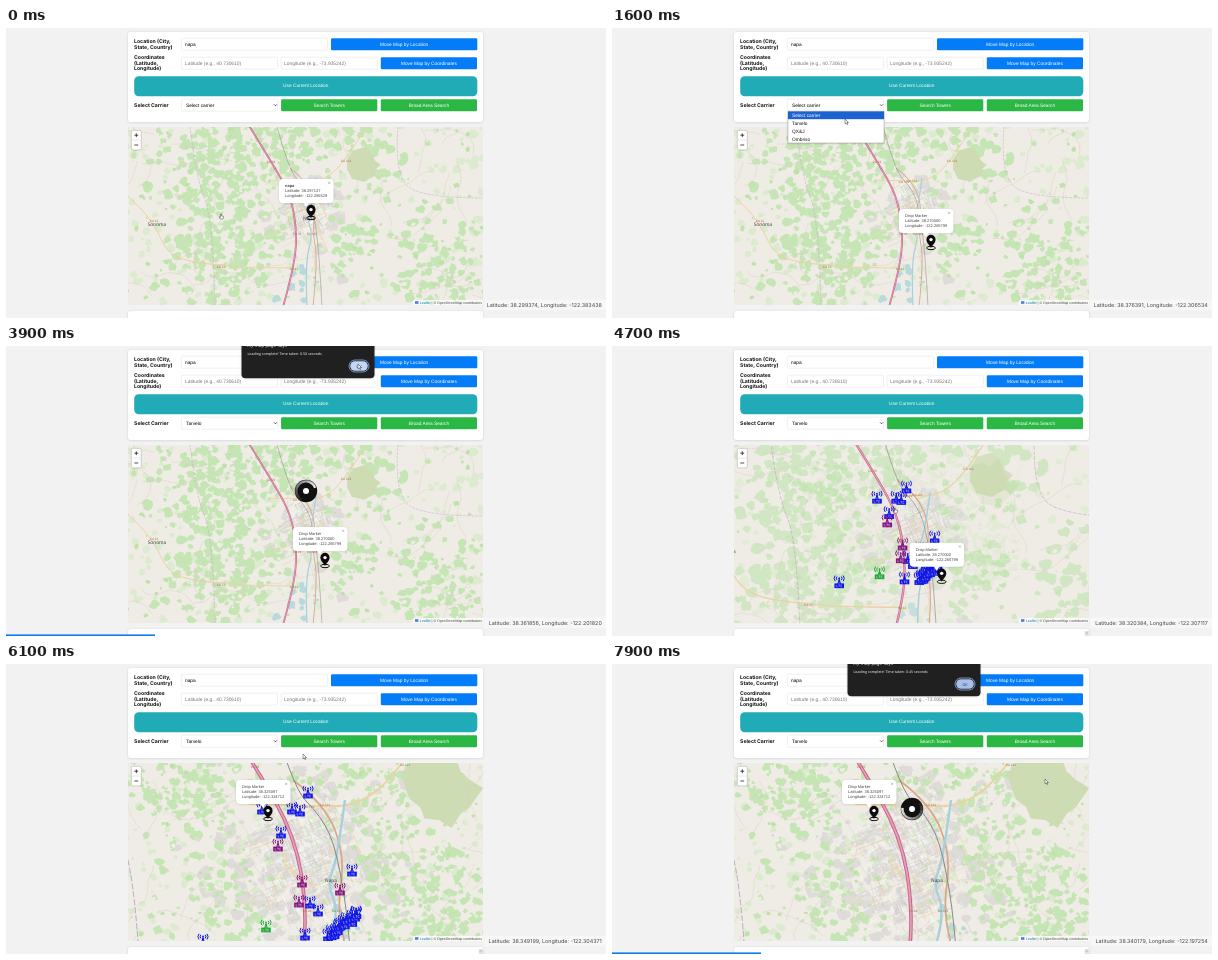
These frames come from a looping animation (600 px wide and 290 px high, 8 s). An HTML page:

```html
<!DOCTYPE html>
<html lang="en">
<head>
<meta charset="utf-8">
<title>Tower search map</title>
<style>
  html, body { margin: 0; width: 100%; height: 100%; overflow: hidden; background: #f2f2f2; }
  svg { display: block; width: 600px; height: 290px; }
  text { font-family: "Liberation Sans", Arial, sans-serif; font-size: 4.8px; text-rendering: geometricPrecision; white-space: pre; }
  .label { font: 700 5.16px Inter, sans-serif; fill: #111; }
  .status { font: 400 5.38px Inter, sans-serif; fill: #444; text-anchor: end; }
  .btn { fill: #fff; text-anchor: middle; }
  .hint { font-size: 4.92px; fill: #777; }
  .small { font-size: 4px; fill: #444; }
  .credit { font-size: 3.58px; fill: #444; }
  .shield { font-size: 3.2px; fill: #a5713f; text-anchor: middle; }
  .place { font: 4.8px "Noto Sans", sans-serif; fill: #444; text-anchor: middle; }
  .dialog { font: 3.62px "Open Sans", sans-serif; fill: #fff; }
  .land path { stroke-linejoin: round; }
</style>
</head>
<body>
<svg id="stage" viewBox="0 0 600 290"></svg>
<script>
const LOOP = 8000;
const FOCUS = [281, 164]; // the point the map zooms around
const $ = id => document.getElementById(id);
const clamp = v => Math.max(0, Math.min(1, v));
const ease = v => { v = clamp(v); return v * v * (3 - 2 * v); };
const mix = (a, b, u) => a.map((v, i) => v + (b[i] - v) * u);
const within = (t, a, b) => t >= a && t < b;

let seed = 29;
const rnd = () => (seed = (seed * 16807) % 2147483647) / 2147483647;
const spread = () => rnd() + rnd() - 1;
const fix = p => p.map(v => v.toFixed(1)).join(' ');
const line = pts => 'M' + pts.map(fix).join('L');

const rect = (x, y, w, h, fill, more = '') =>
  `<rect x="${x}" y="${y}" width="${w}" height="${h}" fill="${fill}" ${more}/>`;
const text = (x, y, str, cls = '', more = '') =>
  `<text x="${x}" y="${y}" class="${cls}" ${more}>${str}</text>`;
const stroke = (d, color, w, more = '') =>
  `<path d="${d}" fill="none" stroke="${color}" stroke-width="${w}" ${more}/>`;
const fill = (d, color) => `<path d="${d}" fill="${color}"/>`;

/* ---------- map ---------- */
function curve(pts) {
  const mid = (a, b) => mix(a, b, 0.5);
  let d = 'M' + fix(pts[0]);
  for (let i = 1; i < pts.length - 1; i++) {
    const end = i < pts.length - 2 ? mid(pts[i], pts[i + 1]) : pts[i + 1];
    d += `Q${fix(pts[i])} ${fix(end)}`;
  }
  return d;
}
function blob(x, y, r) {
  const pts = [];
  for (let a = 0; a < 6.2; a += 0.7) {
    const q = r * (0.6 + 0.7 * rnd());
    pts.push([x + q * 1.1 * Math.cos(a), y + q * Math.sin(a)]);
  }
  return line(pts) + 'Z';
}
// Density field made of soft round spots [x, y, radius].
const field = spots => (x, y) => spots.reduce(
  (sum, [cx, cy, r]) => sum + Math.exp(-((x - cx) ** 2 + (y - cy) ** 2) / (r * r)), 0);
function scatter(density, step, size) {
  let d = '';
  for (let x = 119; x < 482; x += step)
    for (let y = 96; y < 282; y += step) {
      const patchy = 0.45 + 0.4 * Math.sin(x * 0.23 + y * 0.09) * Math.sin(y * 0.21 - x * 0.05);
      if (rnd() < density(x, y) * patchy)
        d += blob(x + step * spread(), y + step * spread(), size * (0.4 + 0.9 * rnd()));
    }
  return d;
}
function streets([cx, cy, r], count, len, tilt) {
  let d = '';
  for (let i = 0; i < count; i++) {
    const x = cx + r * 0.9 * spread(), y = cy + r * 1.2 * spread();
    const a = tilt + (i % 2) * Math.PI / 2, l = len * (0.4 + rnd());
    d += line([[x, y], [x + l * Math.cos(a), y + l * Math.sin(a)]]);
  }
  return d;
}
function trails(count) {
  let d = '';
  for (let i = 0; i < count; i++) {
    let x = 122 + 355 * rnd(), y = 99 + 178 * rnd(), a = 6.3 * rnd();
    const pts = [];
    for (let k = 0; k < 12; k++) {
      a += spread() * 0.8;
      pts.push([x += 6 * Math.cos(a), y += 6 * Math.sin(a)]);
    }
    d += curve(pts);
  }
  return d;
}
function scene({ woods, town, hill, water, size }) {
  const forest = field(woods), built = field([town]), wet = field([water]);
  const open = (x, y) => 1 - clamp(built(x, y) * 1.1);
  return rect(0, 0, 600, 400, '#efece5')
    + fill(scatter(built, 5, 6), '#dedbd9')
    + fill(scatter((x, y) => 0.22, 6, 3.6), '#dcebcf')
    + fill(scatter((x, y) => 1.15 * forest(x, y) * open(x, y), 4.6, size), '#c6e5b5')
    + fill(scatter((x, y) => 0.35 * forest(x, y), 6, 2.2), '#efece5')
    + fill(scatter((x, y) => 0.12, 6, 2.2), '#bfe2ab')
    + fill(blob(...hill) + blob(...hill), '#cddcb3')
    + fill(scatter(wet, 5, 3), '#b8d9de')
    + stroke(trails(44), '#d8cdc2', 0.45)
    + stroke(streets(town, 8 * town[2], 7, 1.15), '#f9f8f6', 0.6)
    + stroke(streets(town, 3 * town[2], 10, 1.15), '#c4bfbc', 0.4)
    + stroke(streets(town, 0.6 * town[2], 22, 1.2), '#ecd9ad', 0.8);
}
const far = {
  woods: [[222, 125, 52], [225, 225, 50], [355, 130, 30], [346, 214, 20], [432, 245, 42], [290, 112, 25]],
  town: [303, 180, 26], hill: [355, 137, 14], water: [296, 256, 15], size: 4
};
const near = {
  woods: [[180, 125, 48], [222, 245, 45], [365, 120, 38], [425, 240, 52], [365, 200, 26]],
  town: [297, 195, 66], hill: [438, 124, 34], water: [338, 262, 9], size: 3.6
};
// Roads carry their shield at every second bend.
const roads = [
  { pts: [[122, 168], [148, 192], [162, 230], [215, 238], [262, 240], [288, 240]], color: '#ecd2a4', w: 1 },
  { pts: [[262, 152], [292, 153], [318, 153], [340, 132], [361, 98]], color: '#ead3a0', w: 0.9, name: 'CA 121' },
  { pts: [[284, 140], [300, 152], [310, 178], [306, 205], [312, 230], [307, 279]], color: '#d9a888', w: 0.9, name: 'CA 121' },
  { pts: [[310, 150], [306, 180], [301, 192], [307, 206], [299, 235], [301, 279]], color: '#a6d1dc', w: 1.2 },
  { pts: [[271, 98], [283, 143], [298, 158], [306, 175], [313, 220], [316, 279]], color: '#8c8784', w: 0.5 },
  { pts: [[242, 96], [265, 133], [285, 168], [291, 205], [288, 240], [277, 279]], color: '#c9648d', w: 1.8, name: 'CA 29' }
];
roads[0].name = 'CA 12';
const borders = [[[184, 98], [190, 150], [207, 190], [209, 279]], [[392, 98], [388, 150], [420, 170], [478, 170]]];
const places = [[303, 190, 'Napa', 'place'], [151, 196, 'Sonoma', 'place']];
for (const { pts, name } of roads)
  if (name) pts.filter((_, i) => i % 2 === 1).forEach(([x, y]) => places.push([x, y, name, 'shield']));

const network = () => borders.map(b => stroke(curve(b), '#bfa9c0', 0.5, 'stroke-dasharray="3 1"')).join('')
  + roads.map(r => stroke(curve(r.pts), r.color, r.w)).join('')
  + stroke(curve(roads[5].pts), '#e6a2b9', 0.8);

/* ---------- towers, placed in zoomed-in coordinates ---------- */
const BLUE = '#1016e6', PURPLE = '#86147f', GREEN = '#22a63c';
const row = (x, y, dx, dy, n, color = BLUE, jitter = 0) =>
  Array.from({ length: n }, (_, i) =>
    [x + i * dx + jitter * spread(), y + i * dy + jitter * spread(), color]);
const towers = [
  row(302, 128, -46, 16, 2), row(286, 144, 8, 2, 2), row(275, 168, 29, 70, 2),
  row(312, 246, -13, 24, 2), row(346, 206, 4, 42, 2), row(197, 276, 0, 0, 1),
  row(322, 271, 2, -1.5, 15, BLUE, 3), row(272, 181, 24, 36, 2, PURPLE),
  row(293, 237, 41, -12, 2, PURPLE), row(260, 262, 0, 0, 1, GREEN)
].flat();

const towerIcon = color => `<g fill="none" stroke="${color}" stroke-width="1">
  <path d="M-2.2-5.2Q-3.6-3.5-2.2-1.6M2.2-5.2Q3.6-3.5 2.2-1.6M-4-6.2Q-6.2-3.5-4-.6M4-6.2Q6.2-3.5 4-.6M0-3.5V2M-1.4 2L0-2L1.4 2"/>
  <circle cy="-3.6" r=".9" fill="${color}" stroke="none"/></g>
  ${rect(-4.8, 1.6, 9.6, 4.8, color)}
  <path d="M-2.9 3v2.2h1.3M-.8 3.1h1.6M0 3v2.2M3 3.1h-1.4v2h1.4" fill="none" stroke="#fff" stroke-width=".45" opacity=".8"/>`;

/* ---------- page ---------- */
const col = i => 175.4 + 99.7 * i; // three equal columns
const W = 96.2, H = 12, ROWS = [10.2, 29.2, 71.2];
const blue = ['#047cf8', '#0560c4'], teal = ['#21abb6', '#1c98a2'], green = ['#2bb744', '#259537'];
const buttons = [
  [325, ROWS[0], 146.3, H, blue, 'Move Map by Location'],
  [col(2), ROWS[1], W, H, blue, 'Move Map by Coordinates'],
  [128.2, 48.2, 343.1, 20, teal, 'Use Current Location'],
  [col(1), ROWS[2], W, H, green, 'Search Towers'],
  [col(2), ROWS[2], W, H, green, 'Broad Area Search']
];
const carriers = ['Select carrier', 'Tarvelo', 'QX&amp;J', 'Ombriso'];
const field2 = (x, y, w) => rect(x, y, w, H, '#fff', 'rx="1.3" stroke="#dadada" stroke-width=".4"');
const labels = (y, step, ...rows) => rows.map((s, i) => text(128, y + i * step, s, 'label')).join('');

function button([x, y, w, h, [base], str], i) {
  const tall = h > H;
  return rect(x, y, w, h, base, `id="btn${i}" rx="${tall ? 4.5 : 1.3}"`)
    + text(x + w / 2, y + h / 2 + (tall ? 0.5 : 1.6), str, 'btn');
}
function ring() {
  let s = '';
  for (let i = 0; i < 16; i++)
    s += `<path d="M0-9.6A9.6 9.6 0 0 1 3.75-8.84" fill="none" stroke="#fff" stroke-width="2.4"
      opacity="${clamp((i - 5) / 11).toFixed(2)}" transform="rotate(${i * 22.5})"/>`;
  return s;
}

$('stage').innerHTML = `
<defs>
  <clipPath id="frame"><rect x="122" y="99" width="355" height="178"/></clipPath>
  <filter id="shade" x="-10%" y="-10%" width="120%" height="130%" color-interpolation-filters="sRGB">
    <feDropShadow dx="0" dy=".4" stdDeviation="1.3" flood-opacity=".14"/></filter>
</defs>
${rect(0, 0, 600, 290, '#f2f2f2')}
${rect(122, 4, 355, 90, '#fff', 'rx="2.4" filter="url(#shade)"')}
${rect(122, 283, 355, 20, '#fff', 'rx="2.4" filter="url(#shade)"')}
${labels(15, 6, 'Location (City,', 'State, Country)')}
${labels(31, 5.6, 'Coordinates', '(Latitude,', 'Longitude)')}
${labels(79, 0, 'Select Carrier')}
${field2(col(0), ROWS[0], 146.3)}${text(179, 17.8, 'napa')}
${field2(col(0), ROWS[1], W)}${text(179, 36.8, 'Latitude (e.g., 40.730610)', 'hint')}
${field2(col(1), ROWS[1], W)}${text(278, 36.8, 'Longitude (e.g., -73.935242)', 'hint')}
${field2(col(0), ROWS[2], W)}<text id="carrier" x="180" y="78.8"></text>
${stroke('M268.1 76.4l1.4 1.4l1.4-1.4', '#222', 0.75)}
${buttons.map(button).join('')}
<g clip-path="url(#frame)">
  <g id="far" class="land">${scene(far)}</g>
  <g id="near" class="land">${scene(near)}</g>
  <g id="roads" class="land">${network()}</g>
  <g id="places">${places.map(p => text(0, 1.5, p[2], p[3])).join('')}</g>
  <g id="towers">${towers.map(p => `<g>${towerIcon(p[2])}</g>`).join('')}</g>
  <g id="pin">
    <ellipse rx="4.4" ry="1.7" fill="none" stroke="#111" stroke-width="1"/>
    <path d="M0 0C-1.3-3.2-4.6-4.8-4.6-8.6A4.6 4.6 0 0 1 4.6-8.6C4.6-4.8 1.3-3.2 0 0Z" fill="#0c0c0c"/>
    <circle cy="-8.4" r="1.7" fill="#fff"/>
  </g>
  <g id="popup">
    <g filter="url(#shade)"><path d="M-8-15.5L-5-11L-2-15.5Z" fill="#fff"/>
    ${rect(-32, -39, 54.5, 24, '#fff', 'rx="4"')}</g>
    ${['title', 'lat', 'lon'].map((id, i) => text(-26, -31 + 5 * i, '', 'small', `id="${id}"`)).join('')}
    ${stroke('M17.2-36.2l2 2m0-2l-2 2', '#777', 0.45)}
  </g>
  <g id="spinner" transform="translate(300 145)">
    <circle r="11.2" fill="#111"/><g id="ring">${ring()}</g><circle r="3" fill="#fff"/>
  </g>
  ${rect(125.3, 102.3, 10, 19.6, '#fff', 'rx="1.4" stroke="#b5b2ad" stroke-width=".6"')}
  ${stroke('M125.3 112.1h10', '#ccc', 0.4)}
  ${stroke('M128.4 107.2h3.8M130.3 105.3v3.8M128.4 117h3.8', '#111', 0.75)}
  ${rect(407, 272, 70, 5, '#fff', 'opacity=".75"')}
  ${rect(409, 273.2, 3.4, 2.6, '#4c7be1')}
  <text class="credit" x="413.8" y="276"><tspan fill="#0078a8">Leaflet</tspan> | © OpenStreetMap contributors</text>
</g>
<g id="scroll">${rect(472.8, 285, 4, 5, '#e2e2e2')}${stroke('M473.8 287.6l1-1l1 1', '#777', 0.5)}</g>
<g id="menu" filter="url(#shade)">
  ${rect(176, 83.2, 96, 31.8, '#fff', 'stroke="#888" stroke-width=".4"')}
  <rect id="pick" x="176" width="96" height="7.8" fill="#1d63cf"/>
  ${carriers.map((s, i) => text(180, 89.1 + i * 7.8, s, '', `id="item${i}"`)).join('')}
</g>
${rect(478.5, 271.5, 121.5, 10.5, '#f7f7f7')}
<text id="status" class="status" x="595.8" y="279.1"></text>
<rect id="bar" y="288.4" height="1.6" fill="#0f7cea"/>
<g id="dialog">
  ${rect(235.5, -12, 133, 44.3, '#202020', 'rx="4" filter="url(#shade)"')}
  ${text(241, 0.8, 'my map page says', '', 'fill="#e4e4e4"')}
  <text id="message" class="dialog" x="241.5" y="8.7"></text>
  ${rect(343, 14, 20, 12, '#202020', 'rx="6" stroke="#8fb4ee" stroke-width=".8"')}
  <rect id="ok" x="344.2" y="15.2" width="17.6" height="9.6" rx="4.8"/>
  ${text(353, 21.5, 'OK', 'dialog', 'text-anchor="middle" style="fill:#11305f"')}
</g>
<g id="cursor" stroke="#222" stroke-width=".45" fill="#fff" stroke-linejoin="round">
  <path id="arrow" d="M0 0V4.8L1.2 3.8L2 5.6L2.8 5.2L2 3.5H3.5Z"/>
  <path id="hand" d="M-.5 0Q0-.7.5 0V1.8L2.4 2.3V4L1.8 5H-.6L-1.8 3.1L-1.3 2.7L-.5 3.2Z"/>
</g>`;

/* ---------- timeline ---------- */
const T = { drop: 700, open: 1450, choose: 1900, search: 2300, alert: 3100, ok: 4000, zoom: 4600,
  drop2: 5600, search2: 6900, alert2: 7450 };
const START = [38.299374, -122.383438], FIRST = [38.27, -122.265799], SECOND = [38.325097, -122.324712];

const zoomAt = t => 2 ** ease((t - T.zoom) / 250);
const project = (p, zoom) => FOCUS.map((f, i) => f + (p[i] - f) * zoom);
const locate = ([lat, lon]) => [215 + (lon - START[1]) / 0.00112, 186 - (lat - START[0]) / 0.00088];

// The pointer arrives at each stop at `t` after travelling for `d`; map stops give latitude and longitude.
const geo = (t, d, pos) => ({ t, d, pos, at: project(locate(pos), zoomAt(t)) });
const spot = (t, d, ...at) => ({ t, d, at });
const stops = [
  geo(0, 1, START), geo(600, 500, FIRST), geo(1200, 300, [38.376391, -122.306534]),
  spot(1400, 200, 226, 78), spot(1600, 100, 233, 91), spot(2250, 350, 395, 79),
  geo(3000, 350, [38.361856, -122.20182]), spot(3800, 600, 352, 18),
  geo(4500, 400, [38.320384, -122.307117]), geo(5500, 250, SECOND),
  geo(6000, 350, [38.349199, -122.304371]), spot(6100, 100, 297, 90), spot(6500, 300, 434, 85),
  spot(6750, 150, 433, 79), geo(7250, 250, [38.340179, -122.197254]), spot(7400, 100, 433, 115)
];
function along(list, key, t) {
  const i = list.findLastIndex(s => t >= s.t - s.d), s = list[Math.max(i, 0)];
  return mix(list[Math.max(i - 1, 0)][key], s[key], clamp((t - s.t + s.d) / s.d));
}
const fixes = stops.filter(s => s.pos);
const markers = [
  { from: 0, at: [305, 190], title: 'napa', pos: [38.297137, -122.285529] },
  { from: T.drop, at: [319, 220], title: 'Drop Marker', pos: FIRST },
  { from: T.drop2, at: [271.5, 159.5], title: 'Drop Marker', pos: SECOND }
];

const show = (id, on) => $(id).setAttribute('display', on ? 'inline' : 'none');
const move = (el, p, k = 1) => el.setAttribute('transform', `translate(${p[0]} ${p[1]}) scale(${k})`);
const zoomLayer = (id, k) => move($(id), FOCUS.map(f => f * (1 - k)), k);

function barWidth(t) {
  if (within(t, T.ok, T.ok + 300)) return 149 + 451 * ease((t - T.ok) / 250);
  if (within(t, T.search, T.ok)) return 149 * ease((t - T.search) / 600);
  return 149 * ease((t - T.search2) / 500);
}

function draw(t) {
  const zoom = zoomAt(t);
  const [cx, cy] = along(stops, 'at', t);
  const dialog = within(t, T.alert, T.ok) || t >= T.alert2;
  const menu = within(t, T.open, T.choose);

  zoomLayer('far', zoom);
  zoomLayer('roads', zoom);
  zoomLayer('near', zoom / 2);
  show('near', zoom > 1);
  $('near').setAttribute('opacity', zoom - 1);
  [...$('places').children].forEach((el, i) => move(el, project(places[i], zoom)));
  show('towers', within(t, T.ok + 50, T.search2));
  [...$('towers').children].forEach((el, i) => move(el, project(towers[i], zoom / 2)));

  const m = markers.findLast(k => t >= k.from), tip = project(m.at, zoom);
  move($('pin'), tip);
  move($('popup'), tip);
  $('title').textContent = m.title;
  $('title').style.fontWeight = m.from ? 400 : 700;
  $('lat').textContent = 'Latitude: ' + m.pos[0].toFixed(6);
  $('lon').textContent = 'Longitude: ' + m.pos[1].toFixed(6);

  show('spinner', within(t, T.search, T.ok) || t >= T.search2);
  $('ring').setAttribute('transform', `rotate(${(t - 2500) * 360 / 1120 - 20})`);

  buttons.forEach(([x, y, w, h, [base, dark]], i) => {
    const over = !dialog && !menu && within(cx, x, x + w) && within(cy, y, y + h);
    $('btn' + i).setAttribute('fill', over ? dark : base);
  });

  show('menu', menu);
  const pick = t > 1700 ? 1 : 0;
  $('pick').setAttribute('y', 83.4 + pick * 7.8);
  carriers.forEach((_, i) => $('item' + i).setAttribute('fill', i === pick ? '#fff' : '#111'));
  $('carrier').innerHTML = carriers[t < T.choose ? 0 : 1];

  const [lat, lon] = along(fixes, 'pos', t);
  $('status').textContent = `Latitude: ${lat.toFixed(6)}, Longitude: ${lon.toFixed(6)}`;
  $('bar').setAttribute('width', barWidth(t));
  show('scroll', t >= T.ok);

  show('dialog', dialog);
  $('message').textContent = `Loading complete! Time taken: ${t < T.search2 ? '0.50' : '0.45'} seconds`;
  $('ok').setAttribute('fill', cy < 26 ? '#c3d6f6' : '#a8bfe8');

  const arrow = menu || dialog || within(cy, 83, 99);
  show('arrow', arrow);
  show('hand', !arrow);
  move($('cursor'), [cx, cy]);
}

function tick(now) {
  draw(now % LOOP);
  requestAnimationFrame(tick);
}
draw(0);
requestAnimationFrame(tick);
</script>
</body>
</html>
```
